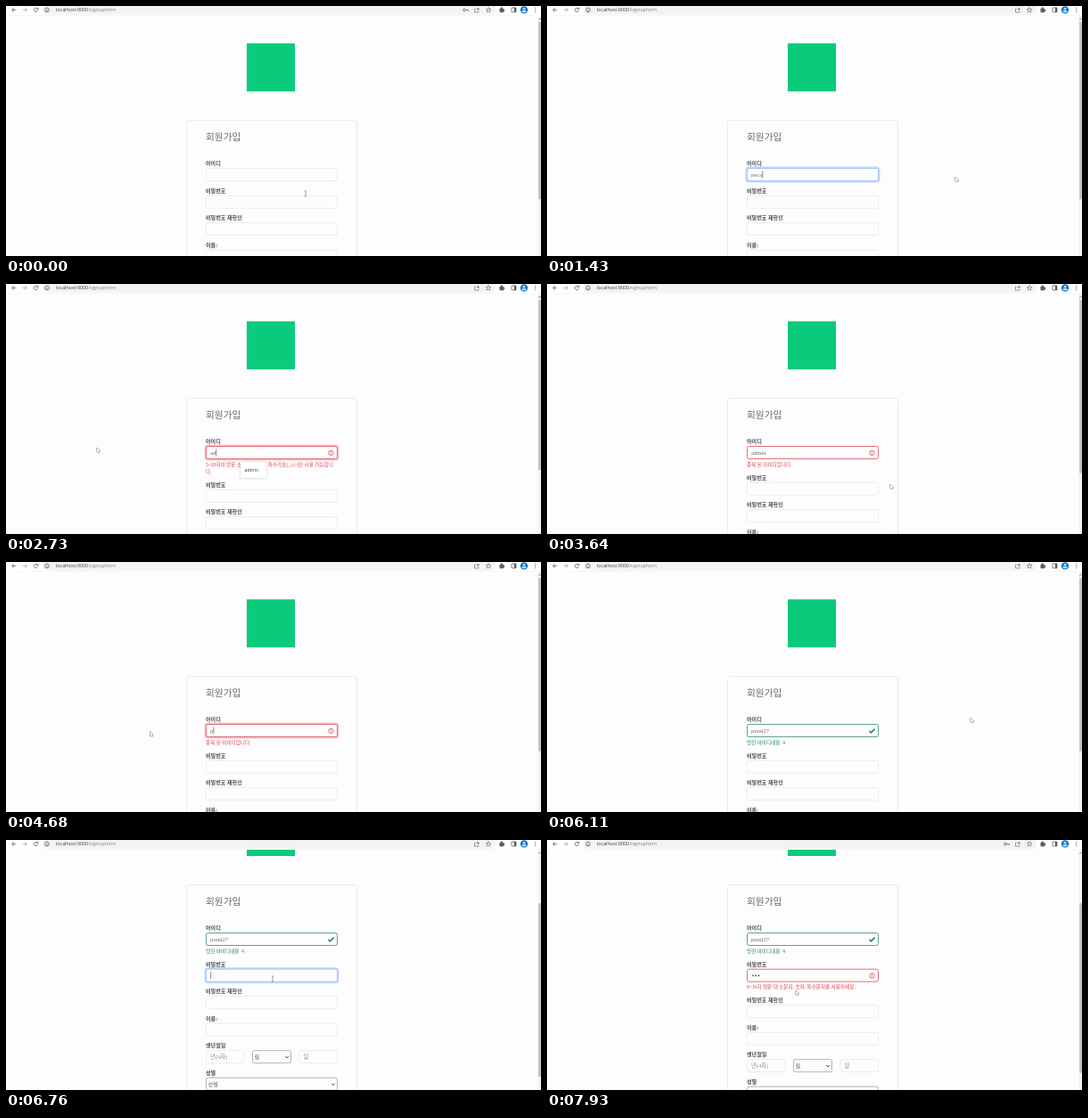
An HTML page with a canvas for the animation above (8000 ms loop, 600 by 281 pixels).

```html
<!DOCTYPE html>
<html lang="ko">
<head>
<meta charset="utf-8">
<title>회원가입</title>
<style>
html, body { margin: 0; width: 100%; height: 100%; overflow: hidden; background: #fdfcfe; }
canvas { display: block; width: 600px; height: 281px; }
</style>
</head>
<body>
<canvas id="stage"></canvas>
<script>
const W = 600, H = 281, LOOP = 8000, STEP = 130, BAR = 11;
const LEFT = 224, WIDE = 148, ROW = 30.5, SCROLL = 78;
const SERIF = '"Liberation Serif", "Noto Sans CJK KR", "Noto Sans CJK", serif';
const SANS = '"Open Sans", "Noto Sans", sans-serif';
const RED = '#d9434f', GREEN = '#2a8660', BLUE = '#8dbbfb', GREY = '#e5e7eb', INK = '#5b5f63';

const canvas = document.getElementById('stage');
const dpr = window.devicePixelRatio || 1;
canvas.width = W * dpr;
canvas.height = H * dpr;
const c = canvas.getContext('2d');

// pointer glides: from, to, end x, end y
const glides = [
  [130, 390, 318, 190], [390, 910, 458, 192], [1430, 1950, 248, 189], [1950, 2340, 102, 184],
  [2730, 3250, 273, 207], [3380, 3640, 385, 225], [3640, 4160, 111, 188],
  [4160, 4290, 161.5, 190.5], [5200, 5980, 475, 175], [6240, 6760, 299, 156],
  [7410, 7930, 279, 169]
];

// typed words: first key, word, time per key
const words = [[910, 'neca', 85], [2340, 'ad', 390], [3380, 'admin', 1], [4680, 'pund27', 52]];

const notes = {
  none: [],
  short: ['5~20자의 영문 소문자, 숫자와 특수기호(_),(-)만 사용 가능합니', '다.'],
  taken: ['중복 된 아이디입니다.'],
  fine: ['멋진 아이디네용 ㅋ'],
  weak: ['8~16자 영문 대 소문자, 숫자, 특수문자를 사용하세요.']
};

const within = (t, from, to) => t >= from && t < to;
const clamp = k => Math.min(1, Math.max(0, k));
const ease = k => k * k * (3 - 2 * k);
const typed = (t, [from, word, rate]) =>
  t < from ? '' : word.slice(0, 1 + Math.floor((t - from) / rate));

function pointer(t) {
  let x = 336, y = 211;
  for (const [from, to, tx, ty] of glides) {
    const k = ease(clamp((t - from) / (to - from)));
    x += (tx - x) * k;
    y += (ty - y) * k;
  }
  return [x, y];
}

function stateAt(t) {
  return {
    id: typed(t, words.findLast(w => t >= w[0]) || words[0]),
    verdict: t < 1560 ? 'none' : t < 3640 ? 'short' : t < 5980 ? 'taken' : 'fine',
    idFocus: within(t, 390, 1560) || within(t, 1950, 3640) || within(t, 3900, 5980),
    pwFocus: within(t, 6760, 7670),
    selected: within(t, 2080, 2340) || within(t, 4030, 4680),
    suggest: within(t, 2730, 3380),
    dots: typed(t, [7150, '•••', 65]).length,
    weak: t >= 7670,
    hasKey: t < 390 || t >= 7150,
    scroll: SCROLL * ease(clamp((t - 6110) / 390))
  };
}

function text(s, x, y, size, color, font = SERIF, weight = 400) {
  c.font = `${weight} ${size}px ${font}`;
  c.fillStyle = color;
  c.fillText(s, x, y);
  return x + c.measureText(s).width;
}

function line(points, color, width = 0.8, close = false) {
  c.beginPath();
  points.forEach(([x, y]) => c.lineTo(x, y));
  if (close) c.closePath();
  c.strokeStyle = color;
  c.lineWidth = width;
  c.stroke();
}

function rect(x, y, w, h, color) {
  c.fillStyle = color;
  c.fillRect(x, y, w, h);
}

function disc(x, y, r, color) {
  c.beginPath();
  c.arc(x, y, r, 0, 7);
  c.fillStyle = color;
  c.fill();
}

function ring(x, y, r, color, from = 0, to = 7) {
  c.beginPath();
  c.arc(x, y, r, from, to);
  c.strokeStyle = color;
  c.lineWidth = 0.8;
  c.stroke();
}

function box(x, y, w, h, r, fill, stroke, width = 0.8) {
  c.beginPath();
  c.roundRect(x, y, w, h, r);
  if (fill) { c.fillStyle = fill; c.fill(); }
  if (stroke) { c.strokeStyle = stroke; c.lineWidth = width; c.stroke(); }
}

function field(y, x = LEFT, w = WIDE, border = GREY, glow = '') {
  if (glow) box(x - 0.2, y - 0.2, w + 0.4, 15.4, 2.5, null, glow, 2.6);
  box(x + 0.5, y + 0.5, w - 1, 14, 2, '#fefdfe', border, 0.75);
}

// field coloured by its verdict and focus, with its mark on the right
function checked(y, bad, good, focused) {
  const border = bad ? RED : good ? GREEN : focused ? BLUE : GREY;
  const glow = bad ? 'rgba(220,53,69,.28)' : 'rgba(13,110,253,.25)';
  field(y, LEFT, WIDE, border, focused ? glow : '');
  const x = 364.5, m = y + 7.8;
  if (bad) {
    ring(x, m, 2.7, RED);
    line([[x, m - 1.5], [x, m + 0.4]], RED);
    disc(x, m + 1.4, 0.45, RED);
  }
  if (good) line([[x - 3, m], [x - 1, m + 2], [x + 3, m - 2.2]], GREEN, 1.6);
}

function select(y, x, w, label) {
  field(y, x, w, '#9a9da1');
  text(label, x + 2.5, y + 9.9, 6.2, '#666');
  const ax = x + w - 5, ay = y + 7;
  line([[ax - 1.7, ay], [ax, ay + 1.8], [ax + 1.7, ay]], '#333', 0.9);
}

const label = (s, y) => text(s, LEFT, y + 1.9, 6.1, '#4a4d50', SERIF, 700);
const caret = (x, y) => line([[x, y + 3.5], [x, y + 11.5]], '#444', 0.6);

function note(key, y) {
  const color = key === 'fine' ? GREEN : RED;
  notes[key].forEach((s, i) => text(s, LEFT, y + i * 8.2, 5.6, color));
}

function idField(s) {
  const bad = s.verdict === 'short' || s.verdict === 'taken';
  label('아이디', 177.2);
  checked(182, bad, s.verdict === 'fine', s.idFocus);
  c.font = `6.7px ${SERIF}`;
  if (s.selected) rect(229, 186, c.measureText(s.id).width, 8, '#b3d4fc');
  const end = text(s.id, 229, 192, 6.7, '#6d7175');
  if (s.idFocus) caret(end + 0.5, 182);
  note(s.verdict, 204.7);
}

function pwField(s, y) {
  label('비밀번호', y);
  checked(y + 4.7, s.weak, false, s.pwFocus);
  for (let i = 0; i < s.dots; i++) disc(231 + i * 3.2, y + 12.4, 0.85, '#444');
  if (s.pwFocus) caret(229.7 + s.dots * 3.2, y + 4.7);
  if (s.weak) note('weak', y + 27.2);
}

function suggestion() {
  c.shadowColor = 'rgba(0,0,0,.3)';
  c.shadowBlur = 2 * dpr;
  box(263, 200, 29, 18.5, 1.5, '#fff');
  c.shadowColor = 'transparent';
  text('admin', 267.5, 211.3, 5.2, '#333', SANS);
}

// returns how far the notes push the page down
function form(s) {
  const push = n => n && 2 + 8 * n;
  const idPush = push(notes[s.verdict].length), pwPush = push(+s.weak);

  box(270, 42, 54, 54, 0, '#0acb7b');
  box(202.5, 128.5, 191, 420, 3, null, '#e4e6ea');
  text('회원가입', LEFT, 151, 10.7, '#666b70');
  idField(s);
  let y = 208 + idPush;
  pwField(s, y);
  y += pwPush;
  for (const name of ['비밀번호 재확인', '이름:']) {
    y += ROW;
    label(name, y);
    field(y + 4.7);
  }
  y += ROW;
  label('생년월일', y);
  const hints = { '년(4자)': LEFT, '일': 328.5 };
  for (const [hint, x] of Object.entries(hints)) {
    field(y + 4.7, x, 43.5);
    text(hint, x + 5, y + 14.6, 6.4, '#868b90');
  }
  select(y + 4.7, 276, 44, '월');
  y += ROW;
  label('성별', y);
  select(y + 4.7, LEFT, WIDE, '성별');
  if (s.suggest) suggestion();
  return idPush + pwPush;
}

function scrollbar(extra, scroll) {
  const view = 292, page = 428 + extra;
  rect(596.5, BAR, 4, H - BAR, '#f3f3f4');
  rect(597, 18 + scroll * view / 428, 3, view * view / page, '#c4c4c6');
  line([[597, 15.6], [598.8, 14], [600.6, 15.6]], '#777');
}

function star(x, y) {
  const points = Array.from({ length: 10 }, (_, i) => {
    const a = i * Math.PI / 5 - Math.PI / 2, r = i % 2 ? 1.3 : 3;
    return [x + r * Math.cos(a), y + r * Math.sin(a)];
  });
  line(points, INK, 0.6, true);
}

function arrow(x, y, dir, size, color) {
  const tip = x + dir * size;
  line([[x - dir * size, y], [tip, y]], color);
  line([[tip - dir * size, y - size], [tip, y], [tip - dir * size, y + size]], color);
}

function toolbar(hasKey) {
  const y = 4.4;
  rect(0, 0, W, BAR, '#fff');
  box(41, -2, 508, 11.5, 5, '#f1f3f4');
  rect(0, BAR - 0.5, W, 0.5, '#ececef');

  arrow(9, y, -1, 2.3, INK);
  arrow(21, y, 1, 2.3, '#a2a5a8');
  ring(33.5, y, 2.2, INK, 0.4, 5.5);
  line([[36, 1.6], [36, 3.8], [33.9, 3.8]], INK);
  ring(46, y, 2.4, INK);
  line([[46, y - 0.2], [46, y + 1.5]], INK);
  disc(46, y - 1.3, 0.4, INK);
  const end = text('localhost:9000', 56, 6.3, 5.36, '#3a3d40', SANS);
  text('/signupform', end, 6.3, 5.36, '#7b7f83', SANS);

  if (hasKey) {
    ring(514, y, 1.4, INK);
    line([[515.5, y], [518.4, y], [518.4, y + 1.5]], INK);
  }
  line([[526.5, 3], [525.5, 3], [525.5, 7], [530, 7], [530, 5.6]], INK, 0.6);
  arrow(529, 3.3, 1, 1.4, INK);
  star(541, y + 0.1);
  box(553.5, 2.7, 4.6, 4.6, 0.5, INK);
  disc(555.8, 2.3, 1, INK);
  disc(558.4, 5, 1, INK);
  box(567, 1.9, 5, 5, 0.5, null, INK);
  rect(569.8, 1.9, 2.2, 5, INK);
  disc(581, y, 4.2, '#1473c8');
  disc(581, y - 1.2, 1.4, '#b9dcf7');
  box(578.5, y + 0.6, 5, 2.2, 1.1, '#b9dcf7');
  for (let i = -1; i < 2; i++) disc(593.7, y + i * 2.2, 0.6, INK);
}

function drawPointer(x, y, s) {
  const idY = 189.5 - s.scroll;
  const pwY = 217 + (s.verdict === 'none' ? 0 : 13) - s.scroll;
  const over = fy => Math.abs(y - fy) < 9 && Math.abs(x - LEFT - WIDE / 2) < WIDE / 2;
  if (over(idY) || over(pwY)) {
    line([[x, y - 3], [x, y + 3]], '#666', 0.6);
    for (const end of [-3, 3]) line([[x - 1.2, y + end], [x + 1.2, y + end]], '#666', 0.5);
    return;
  }
  const shape = [[0, 0], [0, 5.2], [1.2, 4.2], [2, 5.9], [2.8, 5.5], [2.1, 3.9], [3.6, 3.7]];
  line(shape.map(([a, b]) => [x + a, y + b]), '#444', 0.7, true);
  c.fillStyle = '#fff';
  c.fill();
}

function draw(now) {
  // the screen refreshes in even steps
  const t = Math.floor((now % LOOP) / STEP) * STEP;
  const s = stateAt(t);
  c.setTransform(dpr, 0, 0, dpr, 0, 0);
  rect(0, 0, W, H, '#fdfcfe');
  c.save();
  c.translate(0, -s.scroll);
  const extra = form(s);
  c.restore();
  scrollbar(extra, s.scroll);
  toolbar(s.hasKey);
  drawPointer(...pointer(t), s);
}

const start = performance.now();
function loop() {
  draw(performance.now() - start);
  requestAnimationFrame(loop);
}
loop();
</script>
</body>
</html>
```
